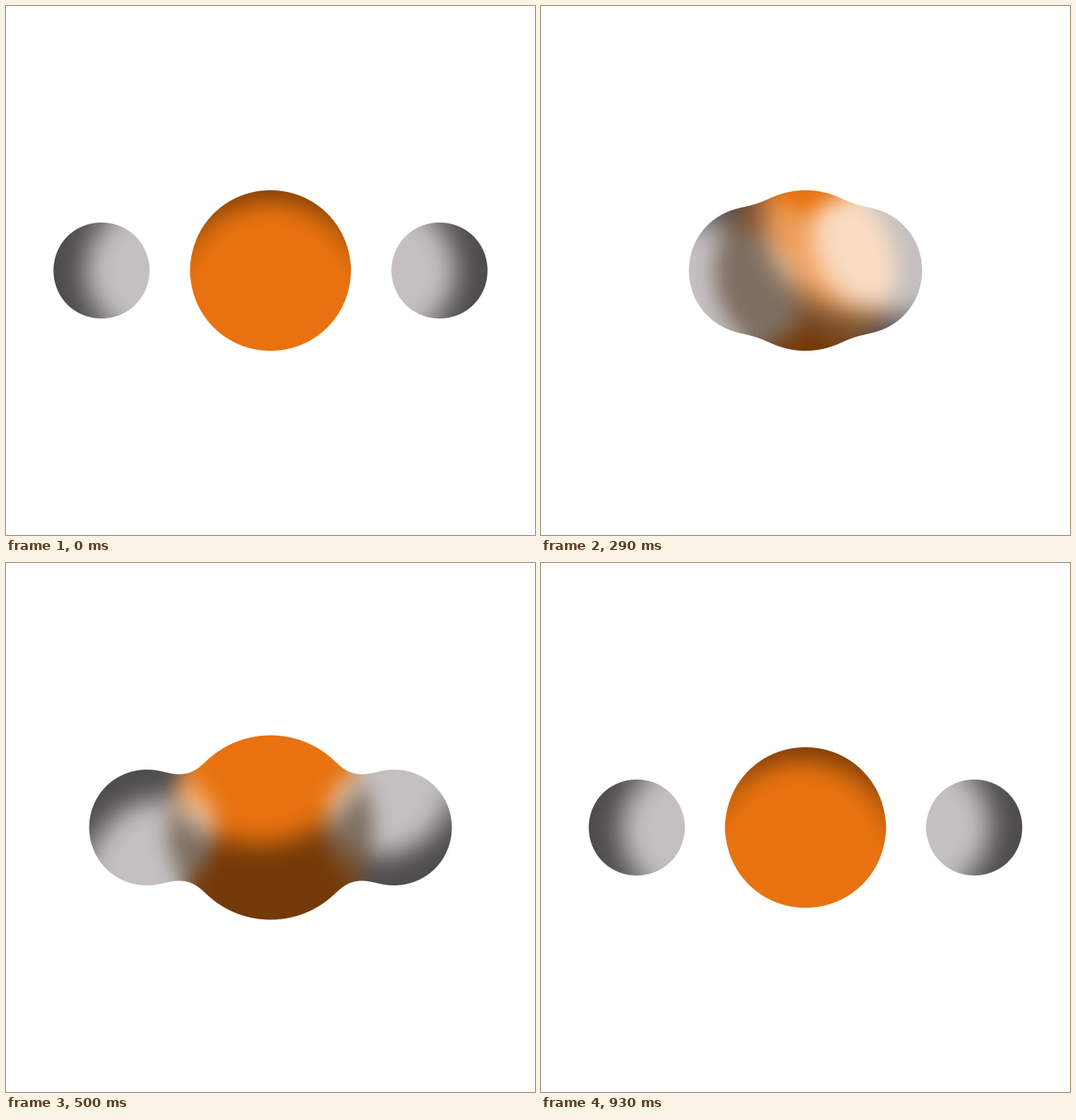
An HTML page with a canvas that plays this animation: 640 by 640 pixels, repeating every 1000 ms.

```html
<!DOCTYPE html>
<html lang="en">
<head>
<meta charset="utf-8">
<title>Gooey spheres</title>
<style>
html, body { margin: 0; width: 100%; height: 100%; overflow: hidden; background: #fff; }
canvas { display: block; width: 640px; height: 640px; }
</style>
</head>
<body>
<canvas id="stage" width="640" height="640"></canvas>
<script>
const LOOP = 1000, STEPS = 14, TICK = 10;
const W = 600, H = 300, LEFT = 20, TOP = 170, MID = 320;
const BLUR = 11, GROW = 20, COLOR_GROW = 13, LEVEL = 0.958;
const ORANGE = [232, 114, 15], LIGHT = [196, 192, 191], DARK = [78, 76, 77];

const clamp = v => Math.min(1, Math.max(0, v));
const mix = (a, b, t) => a + (b - a) * t;
const ease = t => (1 - Math.cos(Math.PI * clamp(t))) / 2;

// Rises from 0 to 1 and falls back.
const bump = (t, from, peak, to) =>
  t < peak ? ease((t - from) / (peak - from)) : ease((to - t) / (to - peak));

// The side spheres rush in until MEET, then drift out; the core's shadow is lowest at TURN.
const MEET = 4, TURN = 6;

function pose(step) {
  const rush = step / MEET;
  const left = 1 - Math.max(0, step - MEET) / (STEPS - MEET);
  const inward = step < MEET;
  const swing = bump(step, 0, TURN, STEPS);
  return {
    gap: mix(64, 204.5, inward ? 1 - ease(rush ** 1.05) : 1 - left ** 2.62),
    side: {
      r: 57.8 + 19.5 * bump(step, 2, 4.2, 10.8),
      angle: inward ? 90 + 225 * rush ** 5 : 450 - 135 * left ** 1.8,
      shift: 61
    },
    core: {
      r: 97 + 18 * bump(step, 4.6, 8, 12),
      angle: step < TURN ? 180 * swing : 360 - 180 * swing,
      shift: mix(34, 118, swing)
    }
  };
}

function blurLine(src, dst, start, stride, n, r) {
  const scale = 1 / (2 * r + 1);
  let sum = 0;
  for (let i = 0; i < r; i++) sum += src[start + i * stride];
  for (let i = 0; i < n; i++) {
    if (i + r < n) sum += src[start + (i + r) * stride];
    if (i > r) sum -= src[start + (i - r - 1) * stride];
    dst[start + i * stride] = sum * scale;
  }
}

// Three box passes come close to a Gaussian.
function blur(field) {
  const spare = new Float32Array(field.length);
  for (let pass = 0; pass < 3; pass++) {
    for (let y = 0; y < H; y++) blurLine(field, spare, y * W, 1, W, BLUR);
    for (let x = 0; x < W; x++) blurLine(spare, field, x, W, H, BLUR);
  }
}

// Shadow outside a lit disc that is pushed away from the dark side,
// whose angle runs counterclockwise from the top.
function shader({ r, angle, shift }) {
  const a = angle * Math.PI / 180;
  const cx = Math.sin(a) * shift, cy = Math.cos(a) * shift;
  return (x, y) => clamp((Math.hypot(x - cx, y - cy) - r - 6) / 32);
}

function drawStep(step) {
  const { gap, side, core } = pose(step);
  // Thresholding the blur shrinks each disc, so start larger.
  const grown = r => r + GROW + 66 / r;
  const sideFull = grown(side.r), coreFull = grown(core.r);
  const sideShade = shader(side), coreShade = shader(core);

  const [shape, cover, ...rgb] = Array.from({ length: 5 }, () => new Float32Array(W * H));

  for (let py = 0, i = 0; py < H; py++) {
    for (let px = 0; px < W; px++, i++) {
      const x = px + LEFT + 0.5 - MID, y = py + TOP + 0.5 - MID;
      // The right sphere is the left one turned by half a circle.
      const flip = x < 0 ? 1 : -1;
      const sx = x * flip + gap, sy = y * flip;
      const sideD = Math.hypot(sx, sy), coreD = Math.hypot(x, y);
      shape[i] = clamp(Math.max(sideFull - sideD, coreFull - coreD) + 0.5);

      const inSide = sideD < side.r + COLOR_GROW;
      const inCore = coreD < core.r + COLOR_GROW;
      if (!inSide && !inCore) continue;
      cover[i] = 1;
      const gray = inSide ? sideShade(sx, sy) : 0;
      const dim = inCore ? 1 - 0.5 * coreShade(x, y) : 1;
      for (let c = 0; c < 3; c++) {
        const s = inSide ? mix(LIGHT[c], DARK[c], gray) : 0;
        const o = inCore ? ORANGE[c] : 0;
        rgb[c][i] = (255 - (255 - s) * (255 - o) / 255) * dim;
      }
    }
  }

  for (const field of [shape, cover, ...rgb]) blur(field);

  const image = new ImageData(W, H);
  for (let i = 0; i < shape.length; i++) {
    const alpha = clamp((shape[i] - LEVEL) * 110 + 0.5);
    if (!alpha) continue;
    const k = 1 / Math.max(cover[i], 1e-4);
    for (let c = 0; c < 3; c++) image.data[i * 4 + c] = rgb[c][i] * k;
    image.data[i * 4 + 3] = alpha * 255;
  }
  return image;
}

const ctx = document.getElementById("stage").getContext("2d");
const images = Array.from({ length: STEPS }, (_, step) => drawStep(step));
const start = performance.now();
let shown = -1;

function render(now) {
  const time = Math.max(0, now - start) % LOOP;
  // Steps change on whole ticks.
  const tick = Math.floor(time / TICK) + 0.5;
  const step = Math.floor(tick * TICK / LOOP * STEPS);
  if (step !== shown) {
    ctx.putImageData(images[step], LEFT, TOP);
    shown = step;
  }
  requestAnimationFrame(render);
}

render(start);
</script>
</body>
</html>
```
